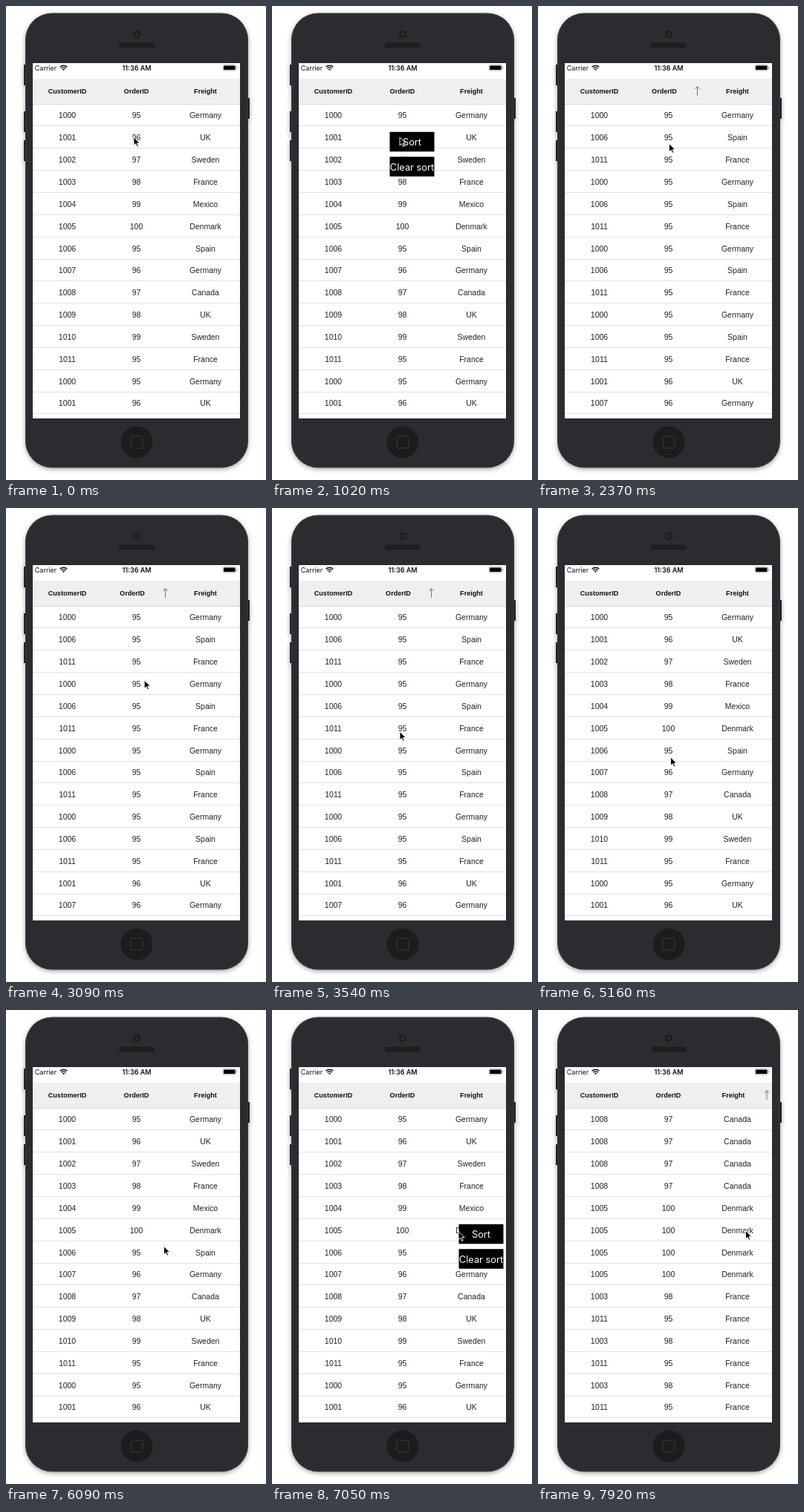
Write an HTML page that moves like this. It is 350x639 px and loops after 8000 ms.

```html
<!DOCTYPE html>
<html lang="en">
<head>
<meta charset="utf-8">
<title>Sortable grid</title>
<style>
html, body { margin: 0; width: 100%; height: 100%; overflow: hidden; background: #fff; }
svg { display: block; width: 350px; height: 639px; }
text { text-anchor: middle; }
.cell { font: 10.5px "Liberation Sans", Arial, sans-serif; fill: #222; }
.head { font: bold 9.1px "Liberation Sans", Arial, sans-serif; fill: #111; }
.status { font: 9px Inter, sans-serif; fill: #111; }
.menu { font: 12.8px Inter, sans-serif; fill: #fff; }
.phone { filter: drop-shadow(0 2px 3px rgba(0, 0, 0, .35)); }
</style>
</head>
<body>
<svg viewBox="0 0 350 639">
  <g class="phone" fill="#2b2c2f">
    <path fill="#222327" d="M24 79h4v28h-4zM24 142h4v28h-4zM24 181h4v28h-4zM324 124h4v28h-4z"/>
    <rect x="26" y="9.5" width="300" height="613" rx="36"/>
  </g>
  <rect x="27" y="10.5" width="298" height="611" rx="35" fill="none" stroke="#38393d"/>
  <circle cx="176" cy="38" r="5" fill="#1c1d1f"/>
  <circle cx="176" cy="38" r="2.5" fill="#2b2c30"/>
  <rect x="152" y="49.5" width="48" height="7" rx="3.5" fill="#1c1d1f"/>
  <circle cx="176" cy="588" r="21.5" fill="#1b1c1e"/>
  <rect x="168" y="580" width="16" height="16" rx="3.5" fill="none" stroke="#303134" stroke-width="1.5"/>

  <rect x="36" y="77" width="279" height="479" fill="#fff"/>
  <text class="status" x="53.5" y="86.5">Carrier</text>
  <g fill="none" stroke="#111" stroke-width="1.6">
    <path d="M72.6 82.2a7 7 0 0 1 9.8 0M74.5 84.2a4.3 4.3 0 0 1 6 0"/>
    <path fill="#111" stroke="none" d="M77.5 87.3l-1.6-1.7a2.3 2.3 0 0 1 3.2 0z"/>
  </g>
  <text class="status" x="176" y="86.5" font-weight="600" style="font-weight:600">11:36 AM</text>
  <rect x="292" y="79.5" width="17.5" height="7.5" rx="1.8" fill="none" stroke="#777" stroke-width=".6"/>
  <rect x="293" y="80.5" width="15.5" height="5.5" rx="1" fill="#000"/>
  <path d="M310.4 82v2.5q1-.4 1-1.25t-1-1.25z" fill="#777"/>
  <rect x="36" y="98" width="279" height="35" fill="#efefef"/>
  <rect x="36" y="132" width="279" height="1" fill="#dadada"/>

  <g id="grid"></g>
  <path id="arrow" d="M0 108.5v12.5M-3 112l3-3.5 3 3.5" fill="none" stroke="#777"/>
  <g id="menu">
    <path d="M.5.5h60v26.5h-60zM.5 34h60v26.5h-60z"/>
    <text class="menu" x="30.5" y="18.5">Sort</text>
    <text class="menu" x="30.5" y="52.3">Clear sort</text>
  </g>
  <path id="cursor" d="M0 0V11.2L2.6 8.8 4.4 12.8 6.2 12 4.5 8.1H8.1Z" stroke="#fff" stroke-width=".9"/>
</svg>
<script>
const LOOP = 8000, STEP = 30, ROW = 29.85;
const CENTERS = [82.5, 175.5, 268.5];
const HEADS = ['CustomerID', 'OrderID', 'Freight'];
const ORDERS = [95, 96, 97, 98, 99, 100, 95, 96, 97, 98, 99, 95];
const COUNTRIES = ['Germany', 'UK', 'Sweden', 'France', 'Mexico', 'Denmark',
  'Spain', 'Germany', 'Canada', 'UK', 'Sweden', 'France'];

const $ = id => document.getElementById(id);
const rows = Array.from({ length: 48 }, (_, i) =>
  [1000 + i % 12, ORDERS[i % 12], COUNTRIES[i % 12]]);

// start, end, end point, optional curve control point
const moves = [
  [1380, 1530, [176.5, 185.5]],
  [2730, 3540, [172, 301.5], [198, 240]],
  [4380, 4530, [168, 301]],
  [4650, 4890, [177, 335.5]],
  [5010, 5160, [178.5, 336]],
  [5760, 6450, [251, 298.5]],
  [7470, 7680, [279.5, 297.5], [333, 304]]
];
const menus = [[1020, 2370, 158, 169.3], [4350, 5040, 158, 288.3], [7050, 7920, 251, 288.3]];

function cursorAt(t) {
  let from = [172, 176.8];
  for (const [start, end, to, ctrl] of moves) {
    if (t < start) break;
    if (t < end) {
      const p = (t - start) / (end - start), s = p * p * (3 - 2 * p), r = 1 - s;
      return from.map((a, i) => {
        const c = ctrl ? ctrl[i] : (a + to[i]) / 2;
        return r * r * a + 2 * r * s * c + s * s * to[i];
      });
    }
    from = to;
  }
  return from;
}

const label = (cls, x, y, text) => `<text class="${cls}" x="${x}" y="${y}">${text}</text>`;

function drawGrid(sortCol) {
  const list = [...rows];
  if (sortCol) list.sort((a, b) => a[sortCol] < b[sortCol] ? -1 : +(a[sortCol] > b[sortCol]));
  let out = HEADS.map((h, i) =>
    label('head', CENTERS[i] - (i && i === sortCol ? 5.5 : 0), 117.6, h)).join('');
  for (let i = 0; i < 14; i++) {
    out += list[i].map((v, c) => label('cell', CENTERS[c], 151.4 + i * ROW, v)).join('');
    out += `<rect x="36" y="${Math.floor(161.9 + i * ROW)}" width="279" height="1" fill="#e2e2e2"/>`;
  }
  $('grid').innerHTML = out;
  $('arrow').style.display = sortCol ? '' : 'none';
  $('arrow').setAttribute('transform', `translate(${sortCol === 2 ? 308 : 214.5} 0)`);
}

const place = (el, x, y) => el.setAttribute('transform', `translate(${x} ${y})`);
let shown = -1;

function frame(now) {
  const t = Math.floor(now % LOOP / STEP) * STEP;
  const sortCol = t >= 7920 ? 2 : t >= 2370 && t < 5040 ? 1 : 0;
  if (sortCol !== shown) drawGrid(shown = sortCol);

  const menu = menus.find(m => t >= m[0] && t < m[1]);
  $('menu').style.display = menu ? '' : 'none';
  if (menu) place($('menu'), menu[2], menu[3]);

  place($('cursor'), ...cursorAt(t));
  requestAnimationFrame(frame);
}
frame(performance.now());
</script>
</body>
</html>
```
